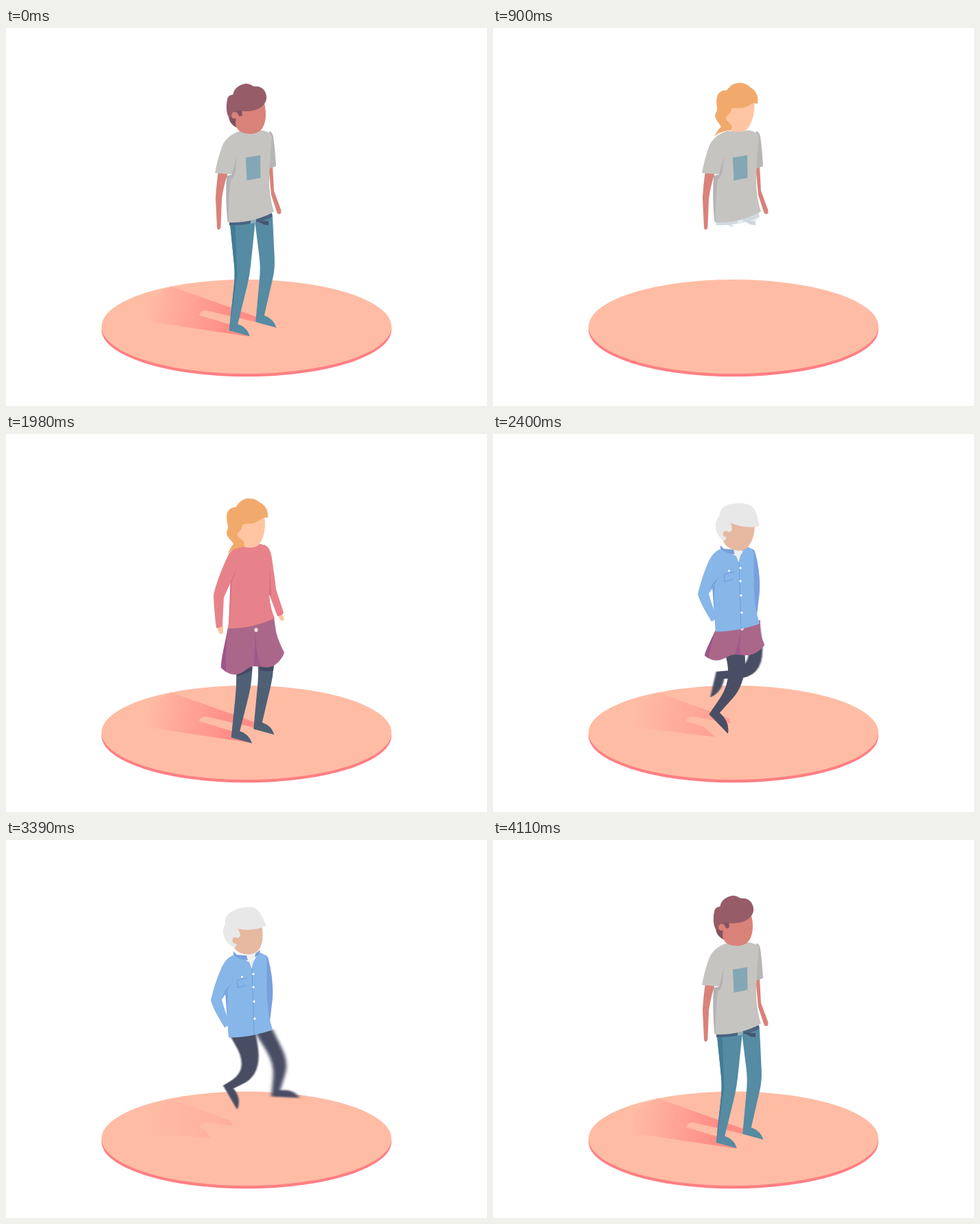
These frames come from a looping animation (700x550 px, 4.56 s). An HTML page:

```html
<!DOCTYPE html>
<html lang="en">
<head>
<meta charset="utf-8">
<title>Wardrobe change</title>
<style>
  html, body { margin: 0; width: 100%; height: 100%; overflow: hidden; background: #fff; }
  svg { display: block; width: 100vw; height: 100vh; }
</style>
</head>
<body>
<svg viewBox="0 0 700 550" xmlns="http://www.w3.org/2000/svg">
  <defs>
    <linearGradient id="fade" gradientUnits="userSpaceOnUse" x1="204" y1="400" x2="325" y2="418">
      <stop offset="0" stop-color="#ff8d86" stop-opacity="0"/>
      <stop offset="1" stop-color="#ff8d86"/>
    </linearGradient>
    <linearGradient id="fold" gradientUnits="userSpaceOnUse" x1="361" y1="0" x2="374" y2="0">
      <stop offset="0" stop-color="#9c5688"/>
      <stop offset="1" stop-color="#9c5688" stop-opacity=".3"/>
    </linearGradient>
    <filter id="blurNear" filterUnits="userSpaceOnUse" x="0" y="0" width="700" height="550"><feGaussianBlur/></filter>
    <filter id="blurFar" filterUnits="userSpaceOnUse" x="0" y="0" width="700" height="550"><feGaussianBlur/></filter>
    <filter id="blurTorso" filterUnits="userSpaceOnUse" x="0" y="0" width="700" height="550"><feGaussianBlur/></filter>
  </defs>

  <ellipse cx="350" cy="438.8" rx="211" ry="68.5" fill="#ff7f83"/>
  <ellipse cx="350" cy="434.5" rx="211" ry="68.5" fill="#ffbca4"/>
  <path id="shadow" fill="url(#fade)"/>

  <g id="legs">
    <path id="far"/>
    <g id="nearLeg">
      <path id="near"/>
      <path id="seam" fill="#437c97"/>
    </g>
    <g id="belt">
      <path d="M325,282 C345,283 370,277 387,269 L388,275 C372,282 345,288 325,287Z" fill="#4b6480"/>
      <path d="M356,280 L364,278 L364,283 L356,285Z" fill="#8fb0bd"/>
      <path d="M364,280 L382,281 L382,287 L375,286Z" fill="#455672"/>
    </g>
  </g>

  <g id="skirt">
    <g id="hem" fill="#3f4b63">
      <path d="M335,342 L358,336 L358,344 C350,347 346,351 336,352Z"/>
      <path d="M369,336 L390,334 L389,344 Q380,347 369,343Z"/>
    </g>
    <path d="M323,281 C345,283 372,277 390,267 L393,288 Q397,303 405,318 C402,328 392,338 384,339 C376,341 368,337 360,338 C350,339 345,350 333,350 C325,350 318,345 313,340 C313,325 319,305 323,281Z" fill="#ab678a"/>
    <path d="M323,283 Q319,310 320,346 L313,340 C313,325 319,305 323,283Z" fill="#9c5688"/>
    <path d="M363,288 L361,338 L373,339 C365,328 364,305 363,288Z" fill="url(#fold)"/>
    <ellipse cx="364" cy="285" rx="2.6" ry="3.1" fill="#f1dfdc"/>
  </g>

  <g id="torso0">
    <g fill="#d9827a">
      <path d="M309,208 L323,210 C318,226 315,240 314,250 L312.500,289 C312,295 307,295 307,289 L305,247 C306,233 307,222 309,208Z"/>
      <path d="M382,200 L388,200 L390,237 L400,264 C402,272 397,272 394.500,269 L386,243Z"/>
    </g>
    <path d="M383,150 Q388,152 389,158 C391,172 392,185 393,201 L382,205Z" fill="#b8b5b6"/>
    <path d="M321,215 L335,212 L328,283 L322.500,282 Q319,250 321,215Z" fill="#b3b2b5"/>
    <path d="M340,150 C326,155 318,163 314.500,172 Q308,190 304,211 L329,213 L327,220 Q323,250 324,283 C347,284 372,278 390,267 Q384,250 383,225 Q383,200 387,158 Q385,151 373,149Z" fill="#c6c4c0"/>
    <path d="M336,186 L334,208 L330,219 L326,219 L329,213Z" fill="#b3b2b5"/>
    <path d="M349,188.500 L370,185 L370.500,218 L350.500,222Z" fill="#83a7b4"/>
  </g>

  <g id="torso1">
    <path d="M346,163 Q332,166 330,182 L326.500,216 Q327,250 323,283 C347,283 372,277 391,268 Q384,252 383,233 L387,182 Q383,162 370,160Z" fill="#e8828a"/>
    <g id="armR">
      <path d="M396,263 L402,260 L405,269 Q402,275 398,269Z" fill="#ffc4a0"/>
      <path d="M375,161 Q385,164 387,182 Q390,200 393,226 L404,260 Q401,265 395,265 L383,233Z" fill="#e8828a"/>
      <path d="M384,193 L386,236 L383,234Z" fill="#d27080"/>
    </g>
    <g id="armL">
      <path d="M307,280 L316,278 L316,289 Q312,294 309,288Z" fill="#ffc4a0"/>
      <path d="M346,163 C334,165 328,169 324,175 C314,196 306,216 302,235 Q303,260 306,282 Q311,283 315,279 L317,238 L338,191Z" fill="#e8828a"/>
    </g>
    <path d="M338,191 L328,217 Q328,250 324,280 L326.500,216Z" fill="#d27080"/>
  </g>

  <g id="torso2">
    <path d="M376,167 Q381,168 382,174 C387,193 389,212 388,230 L384,264 L376,260Z" fill="#78a0dc"/>
    <path d="M319,222 L331,205 L331,287 L324,286Z" fill="#78a0dc"/>
    <path d="M326,269 Q332,270 332,278 Q328,281 323,273Z" fill="#dfa992"/>
    <path d="M335,167 C324,168 318,177 314,185 Q304,207 298,233 C303,250 312,262 318,273 L327,268 Q318,249 314,232 L323,219 Q321,250 324,287.500 C346,288 372,282 388,276 L384,262 Q378,235 380,174 Q377,164 368,164 L358,180Z" fill="#87b6e9"/>
    <path d="M330,206 L314,232 L319,219Z" fill="#78a0dc"/>
    <path d="M350,167 L363,165 L357.500,187Z" fill="#f0f0f2"/>
    <path d="M331,162 L336,167 L350,168 L352,175 Q338,174 331,167Z M370,160 L369,166 L362,171 L363,165Z" fill="#78a0dc"/>
    <path d="M358,187 L361,283 M336.500,204 L337,215 L350,211 M336.500,204 L351,201" fill="none" stroke="#6e9bdc"/>
    <g fill="#fff">
      <circle cx="360" cy="195" r="1.700"/><circle cx="360" cy="214" r="1.700"/>
      <circle cx="361" cy="235" r="1.700"/><circle cx="362" cy="260" r="1.700"/>
      <circle cx="343.500" cy="199" r="1.500"/>
    </g>
  </g>

  <g id="head0">
    <path d="M336,145 C328,141 324,136 324,126 L330,112 L345,118 L344,127 L337,132Z" fill="#84505e"/>
    <path d="M336,118 L376,110 C379,122 379,135 374,144 C370,152 362,154 355,154 C343,154 335,149 334,139Z" fill="#d9827a"/>
    <ellipse cx="332.500" cy="127" rx="4.500" ry="5" fill="#d9827a"/>
    <path d="M324,130 C319,120 321,106 323,101 C326,96 330,98 331,96 C331,88 342,81 350,81 C356,81 358,85 363,85 C372,84 378,91 379,99 C380,108 374,114 368,117 C360,121 352,122 343,121 L336,121 C330,121 328,124 328,130Z" fill="#965d68"/>
    <path d="M335,121 L343,120 L344,127 L340,129Z" fill="#84505e"/>
  </g>

  <g id="head1">
    <path d="M342,130 C355,130 366,122 376,119 C378,132 377,145 372,155 C368,165 358,167 346,164 C345,158 340,152 337,146Z" fill="#ffc5a3"/>
    <path d="M323,175 C325,168 328,163 331,160 C327,153 321,150 321,144 C321,139 325,138 322,130 C321,122 320,115 325,110 C329,106 333,107 335,106 C340,97 348,93 356,94 C362,94 366,97 370,100 C377,104 382,110 381,122 C372,120 372,126 360,130 C354,131 348,130 344,132 C344,140 338,142 337,146 C338,152 345,153 347,159 L346,164 C338,165 328,168 323,175Z" fill="#f1aa6b"/>
  </g>

  <g id="head2">
    <path d="M335,126 L372,124 C375,138 374,152 367,161 C359,169 341,169 332,157Z" fill="#e7b8a0"/>
    <path d="M333,157 C322,152 317,143 316,134 C316,128 318,125 319,122 C317,112 325,104 335,101 C345,97 357,96 364,100 C370,104 376,117 379,125 C365,131 350,132 337,129 Q341,134 341,140 L337,143 L331,147 L336,152Z" fill="#e8e8e8"/>
    <ellipse cx="333.500" cy="146" rx="4" ry="4.500" fill="#e7b8a0"/>
  </g>
</svg>

<script>
const LOOP = 4560;
const STEP = 660; // one full run cycle, ms

const $ = id => document.getElementById(id);
const put = (id, name, value) => $(id).setAttribute(name, value);
const mix = (a, b, f) => a + (b - a) * f;
const mixAll = (a, b, f) => a.map((v, i) => mix(v, b[i], f));
const shift = (p, x, y) => [p[0] + x, p[1] + y];
const clamp = v => Math.max(0, Math.min(1, v));
const fmt = (...pts) => pts.map(p => p[0].toFixed(2) + ',' + p[1].toFixed(2)).join(' ');

// Smooth step from 0 to 1, and a rise followed by a fall
function ease(t, from, to) {
  const f = clamp((t - from) / (to - from));
  return f * f * (3 - 2 * f);
}
const bump = (t, a, b, c, d) => ease(t, a, b) * (1 - ease(t, c, d));

// How much of outfit n shows when the cycle of three stands at state
const weight = (state, n) => clamp(1 - Math.min(Math.abs(state - n), Math.abs(state - n - 3)));

const TROUSERS = {
  fill: [85, 139, 163],
  near: { hip: [344.5, 283], half: [18.5], knee: [344, 360], ankle: [331, 435.5] },
  far: { hip: [375, 278], half: [13], knee: [381, 349], ankle: [369.5, 423] }
};
const TIGHTS = {
  fill: [79, 96, 117],
  near: { hip: [348, 300], half: [14], knee: [346, 367], ankle: [334, 437] },
  far: { hip: [378, 295], half: [14], knee: [378, 352], ankle: [366.5, 424.5] }
};
const LEGWEAR = [TROUSERS, TIGHTS, { ...TROUSERS, fill: [74, 78, 100] }];

// Thigh, shin and foot swing as three lagging waves
const wave = (phase, mean, size, lag) => mean + size * Math.cos(2 * Math.PI * phase - lag * Math.PI / 180);
const swing = phase => [wave(phase, -16, 20, 151), wave(phase, 40, 50, 176), wave(phase, 34, 80, 167)];

function turn(p, from, to, deg, size) {
  const r = deg * Math.PI / 180, x = (p[0] - from[0]) * size, y = (p[1] - from[1]) * size;
  return [to[0] + x * Math.cos(r) - y * Math.sin(r), to[1] + x * Math.sin(r) + y * Math.cos(r)];
}

// Bends a leg at its joints; returns the outline and the seam
function bend({ hip, half: [w], knee, ankle }, [thigh, shin, foot], len, stride) {
  const thick = Math.min(1, len * 3);
  const k = turn(knee, hip, hip, thigh, len);
  const a = turn(ankle, knee, k, shin, len * (1 - .2 * stride));
  const hl = shift(hip, -w, w * .1), hr = shift(hip, w, -w * .2);
  const [kl, kr] = [-1, 1].map(s => turn([s * 10.5, s], [0, 0], k, (thigh + shin) / 2, thick));
  const [al, ar] = [-1, 1].map(s => turn([s * 6.3, s * -4.7], [0, 0], a, shin, thick));
  const [instep, toe] = [[20, 0], [24, 13]].map(p => turn(p, [0, 0], a, foot, thick * (1 + .3 * stride)));
  const round = .2 + .5 * clamp(Math.abs(shin - thigh) / 60);
  const side = (p, q, r) => `L${fmt(mixAll(q, p, round))} Q${fmt(q, mixAll(q, r, round))} L${fmt(r)}`;
  return [
    `M${fmt(hr)} ${side(hr, kr, ar)} Q${fmt(instep, toe)} L${fmt(al)} ${side(al, kl, hl)}Z`,
    `M${fmt(hl, mixAll(hl, hr, .2), mixAll(kl, kr, .14), al)} ${side(al, kl, hl)}Z`
  ];
}

function blur(id, target, x, y) {
  if (x + y > .15) {
    $(id).firstChild.setAttribute('stdDeviation', x.toFixed(2) + ' ' + y.toFixed(2));
    put(target, 'filter', `url(#${id})`);
  } else $(target).removeAttribute('filter');
}

function show(id, opacity) {
  put(id, 'opacity', opacity.toFixed(3));
  put(id, 'display', opacity > .005 ? 'inline' : 'none');
}

function drawLegs(t) {
  const state = ease(t, 900, 930) + ease(t, 2130, 2310) + ease(t, 3450, 3600);
  const from = LEGWEAR[Math.floor(state) % 3], to = LEGWEAR[Math.floor(state + 1) % 3], f = state % 1;
  const len = 1 - .95 * bump(t, 300, 900, 960, 1420) - .25 * bump(t, 3150, 3390, 3480, 3720);
  const stride = bump(t, 300, 480, 900, 1290) + bump(t, 2070, 2250, 2430, 2580) + bump(t, 3150, 3300, 3510, 3720);
  const lean = 6 * bump(t, 1170, 1350, 1350, 1590);
  const phase = .2 + (t - 2400) / STEP;

  const leg = (side, ph) => {
    const shape = {};
    for (const part in from[side]) shape[part] = mixAll(from[side][part], to[side][part], f);
    return bend(shape, swing(ph).map(deg => lean + stride * deg), len, stride);
  };
  const [near, seam] = leg('near', phase), [far] = leg('far', phase + .4);
  const fill = `rgb(${mixAll(from.fill, to.fill, f).map(Math.round)})`;
  put('near', 'd', near);
  put('near', 'fill', fill);
  put('far', 'd', far);
  put('far', 'fill', fill);
  put('seam', 'd', seam);
  show('seam', weight(state, 0));
  show('belt', weight(state, 0));
  show('hem', 1 - Math.max(stride, lean / 6));
  show('legs', 1 - bump(t, 840, 930, 960, 1020));
  const speed = stride * Math.min(3, .8 + 8 * (1 - len));
  blur('blurNear', 'nearLeg', speed * .35, speed * .25);
  blur('blurFar', 'far', speed, speed * .3);
}

function drawShadow(t) {
  const k = 1 - bump(t, 300, 780, 1050, 1500) - .4 * bump(t, 1980, 2280, 2430, 2580)
    - .73 * bump(t, 3150, 3390, 3480, 3720);
  const s = clamp((1 - k) * 1.3);
  const upA = mixAll([364, 420], [325, 408], s), upB = mixAll([365, 428], [327, 415], s);
  const lowA = mixAll([328, 432], [287, 421], s), lowB = mixAll([354, 449], [295, 433], s);
  put('shadow', 'd', `M240,376 L${fmt(upA)} Q${fmt(shift(mixAll(upA, upB, .5), 2, 1), upB)}
    L291,411 Q283,411 281,418 L${fmt(lowA, lowB)} L208,427 L195,400Z`);
  show('shadow', k);
}

function drawTorso(t) {
  const state = ease(t, 1230, 1440) + ease(t, 2100, 2340) + ease(t, 3660, 3930);
  for (let n = 0; n < 3; n++) {
    const w = weight(state, n), gone = 1 - w;
    put('torso' + n, 'transform',
      `translate(357 283) skewX(${-16 * gone}) scale(${1 - .4 * gone} ${w}) translate(-357 -283)`);
    show('torso' + n, clamp(w * 5));
  }
  const tuck = 1 - weight(state, 1);
  put('armL', 'transform', `rotate(${-24 * tuck} 335 172)`);
  put('armR', 'transform', `rotate(${24 * tuck} 380 170)`);
  blur('blurTorso', 'torso1', clamp(tuck * 2.5) * .6, clamp(tuck * 2.5) * 1.8);
}

function drawSkirt(t) {
  const on = bump(t, 960, 1290, 2250, 2520), off = 1 - on;
  put('skirt', 'transform',
    `translate(357 280) skewX(${-20 * off}) scale(${1 - .15 * off} ${1 - .5 * off}) translate(-357 -280)`);
  show('skirt', clamp(on * 3));
}

function drawHead(t) {
  const state = ease(t, 600, 690) + ease(t, 2130, 2220) + ease(t, 3780, 3870);
  const tilt = 5 * bump(t, 660, 840, 900, 1200) + 12 * bump(t, 2160, 2340, 2400, 2520)
    + 5 * bump(t, 3810, 3900, 3900, 4080);
  const floating = 1 - bump(t, 1350, 1560, 2040, 2160);
  const lift = [0, -12 * floating - .5 * tilt, .25 * tilt];
  lift.forEach((dy, n) => {
    put('head' + n, 'transform', `translate(${.68 * tilt} ${dy}) rotate(${tilt} 350 130)`);
    show('head' + n, weight(state, n));
  });
}

function render(t) {
  for (const draw of [drawShadow, drawLegs, drawSkirt, drawTorso, drawHead]) draw(t);
}

const start = performance.now();
function frame() {
  render((performance.now() - start) % LOOP);
  requestAnimationFrame(frame);
}
frame();
</script>
</body>
</html>
```
